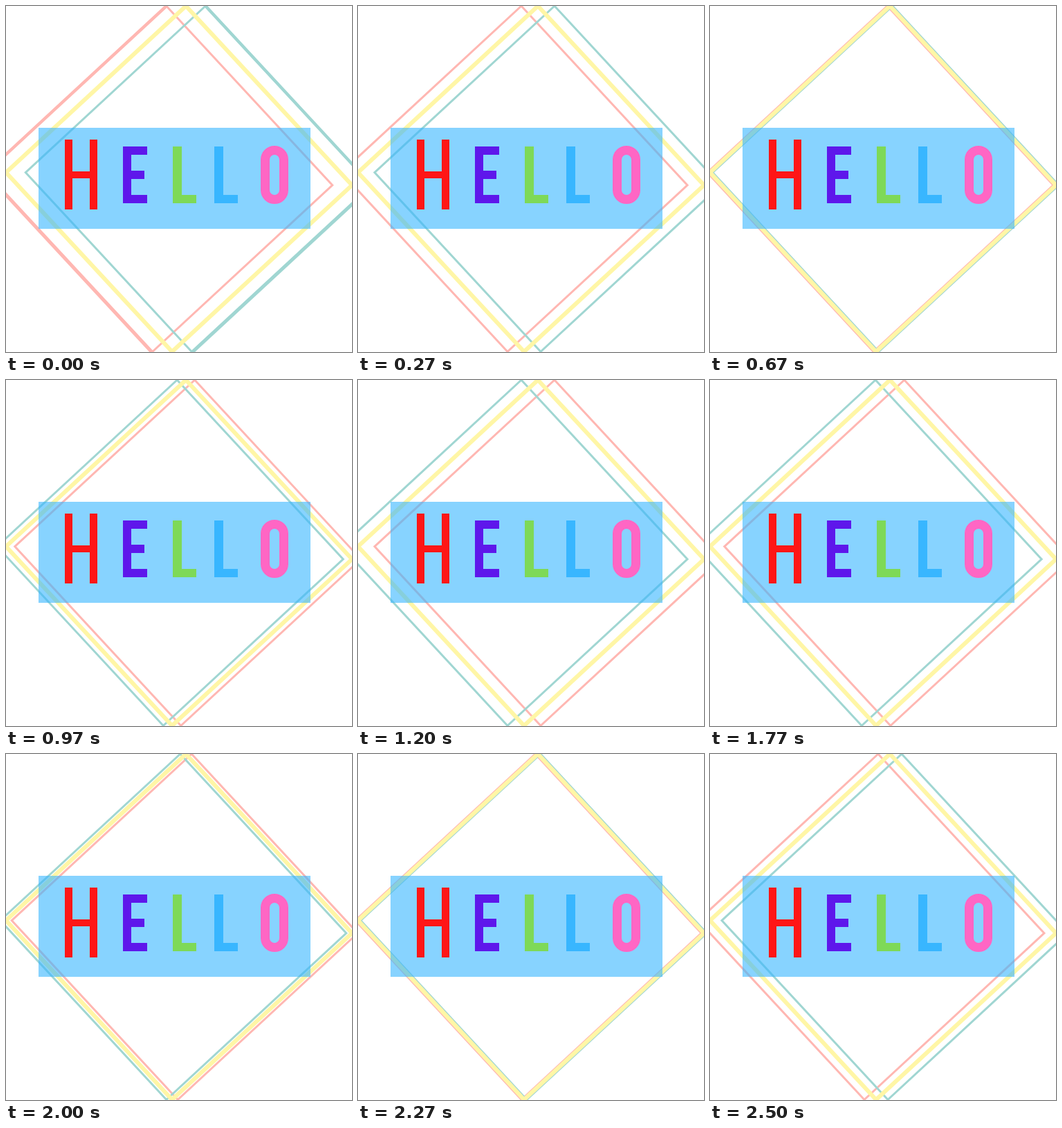
An HTML page with a canvas for the animation above (2.57 s loop, 500 by 500 pixels).

```html
<!DOCTYPE html>
<html lang="en">
<head>
<meta charset="utf-8">
<title>Hello</title>
<style>
  html, body { margin: 0; width: 100%; height: 100%; overflow: hidden; background: #fff; }
  canvas { display: block; width: 500px; height: 500px; }
</style>
</head>
<body>
<canvas id="stage" width="500" height="500" role="img" aria-label="HELLO"></canvas>
<script>
const ctx = document.getElementById("stage").getContext("2d");
const LOOP = 2570;
const SWING = 28.3;
const PINK = "#ffb7b2", TEAL = "#a0d6d2", YELLOW = "#fff6a6";
const TOP = [260, 0], RIGHT = [500, 258.9], BOTTOM = [240, 499.5], LEFT = [0, 240.6];

// 12.5 poses per second, snapped to a 30 Hz clock with 10 ms resolution
const poseStart = k => Math.round(Math.ceil(12 * k / 5) * 10 / 3) * 10;

function poseAt(time) {
  let k = 0;
  while (poseStart(k + 1) <= time) k++;
  return k;
}

function offsetOf(pose) {
  const c = Math.cos(pose * Math.PI / 18);
  return SWING * Math.sign(c) * Math.abs(c) ** 1.15;
}

function strokePath(points, dx, dy, color, width, closed) {
  ctx.beginPath();
  for (const [x, y] of points) ctx.lineTo(x + dx, y + dy);
  if (closed) ctx.closePath();
  ctx.strokeStyle = color;
  ctx.lineWidth = width;
  ctx.stroke();
}

function diamond(dx, color, width) {
  strokePath([TOP, RIGHT, BOTTOM, LEFT], dx, 0, color, width, true);
}

// The outward side gets heavier, mostly below, close to the end of the swing
function thinDiamond(dx, color) {
  diamond(dx, color, 3);
  const extra = Math.max(0, Math.abs(dx) - 25.3) / 2;
  if (extra > 0) {
    const side = dx < 0 ? LEFT : RIGHT;
    strokePath([TOP, side, BOTTOM], dx + Math.sign(dx), 1, color, 3 + extra, false);
  }
}

function bars(color, ...rects) {
  ctx.fillStyle = color;
  for (const [x0, y0, x1, y1] of rects) ctx.fillRect(x0, y0, x1 - x0, y1 - y0);
}

function letterL(x, color) {
  bars(color, [x, 203, x + 13, 285], [x, 273, x + 34, 285]);
}

function lettering() {
  bars("#ff1616", [85, 193, 96, 294], [121, 193, 132, 294], [85, 239, 132, 249]);
  bars("#5e17eb", [169, 203, 181, 285], [169, 203, 204, 215],
    [169, 238, 200, 250], [169, 273, 204, 285]);
  letterL(241, "#7ed957");
  letterL(301, "#38b6ff");
  ctx.beginPath();
  ctx.roundRect(374.5, 208.5, 27, 71, 13.5);
  ctx.strokeStyle = "#ff66c4";
  ctx.lineWidth = 13;
  ctx.stroke();
}

function draw(time) {
  const dx = offsetOf(poseAt(time));
  bars("#fff", [0, 0, 500, 500]);
  thinDiamond(-dx, PINK);
  thinDiamond(dx, TEAL);
  diamond(0, YELLOW, 6);
  bars("rgba(56, 182, 255, 0.6)", [47, 176, 440, 322]);
  lettering();
}

const origin = performance.now();
function tick() {
  draw((performance.now() - origin) % LOOP);
  requestAnimationFrame(tick);
}
tick();
</script>
</body>
</html>
```
